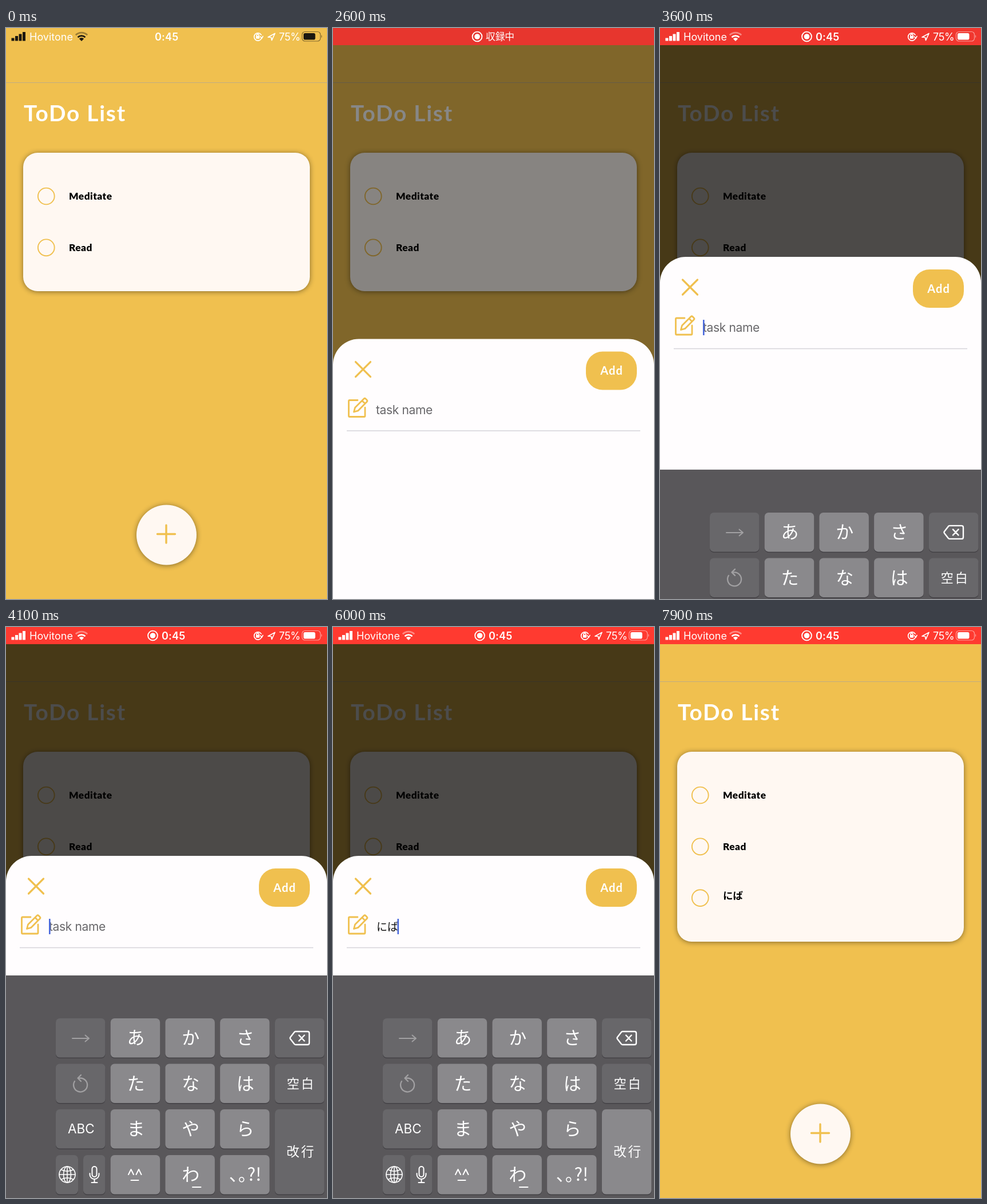
An HTML page for the animation above (8 s loop, 561 by 998 pixels).

```html
<!DOCTYPE html>
<html lang="ja">
<head>
<meta charset="utf-8">
<title>ToDo List</title>
<style>
  html, body { margin: 0; width: 100%; height: 100%; overflow: hidden; background: #f0c04f; }
  svg { display: block; width: 100%; height: 100%; }
  text { white-space: pre; }
  .lato { font-family: Lato, sans-serif; font-weight: 700; }
  .inter { font-family: Inter, sans-serif; }
  .cjk { font-family: "Noto Sans CJK JP", "Noto Sans CJK", sans-serif; }
  .mid { text-anchor: middle; }
  .gold { fill: none; stroke: #f0c04f; stroke-linecap: round; stroke-linejoin: round; }
  .line { fill: none; stroke: #fff; stroke-linecap: round; stroke-linejoin: round; }
  .ink { fill: currentColor; }
  .ink .open { fill: none; stroke: currentColor; }
  .shadow { filter: drop-shadow(0 1px 5px rgba(0, 0, 0, .45)); }
</style>
</head>
<body>
<svg viewBox="0 0 561 998">
  <rect width="561" height="998" fill="#f0c04f"/>
  <path d="M0 95.5H561" stroke="#bfad84"/>
  <text class="lato" x="31" y="163" font-size="38.8" letter-spacing="1.8" fill="#fff">ToDo List</text>

  <rect id="card" class="shadow" x="30" y="218" width="501" height="242" rx="25" fill="#fff8f2"/>
  <g id="rows"></g>

  <circle class="shadow" cx="280.5" cy="886" r="52.5" fill="#fff8f2"/>
  <path class="gold" stroke-width="3.4" d="M264.5 884.5H295.5M280 869V900"/>

  <rect id="dim" width="561" height="998" opacity="0"/>

  <g id="sheet">
    <path d="M0 1000V445A45 45 0 0 1 45 400H516A45 45 0 0 1 561 445V1000Z" fill="#fffdfe"/>
    <path class="gold" stroke-width="3.2" d="M39.5 440L65.5 466M65.5 440L39.5 466"/>
    <rect x="442" y="422" width="89" height="67" rx="29" fill="#f0c04f"/>
    <text class="lato mid" x="487" y="462.5" font-size="20" letter-spacing="1.1" fill="#fff">Add</text>
    <path class="gold" stroke-width="2.8" d="M43 507H29Q27.5 507 27.5 508.5V534.5Q27.5 536 29 536H54.5Q56 536 56 534.5V520M36.5 527.5L38.5 520L54 504.5Q55.5 503 57 504.5L59.2 506.7Q60.7 508.2 59.2 509.7L44 525.3ZM51 508L56 513"/>
    <path d="M24 560.5H537" stroke="#d5d4d9" stroke-width="1.6"/>
    <text id="hint" class="inter" x="75" y="531.3" font-size="21" letter-spacing="-.35" fill="#68676a">task name</text>
    <text id="typed" class="cjk" x="76" y="530.5" font-size="19" fill="#111"></text>
    <rect id="caret" x="75" y="510" width="2.6" height="27" fill="#4a69dc"/>
  </g>

  <g id="board">
    <rect y="609" width="561" height="400" fill="#59575a"/>
    <g id="keys"></g>
    <g class="line" stroke-width="2">
      <path stroke="#a1a0a2" d="M116 719H145M138.5 713.5L145 719L138.5 724.5"/>
      <path stroke="#a1a0a2" stroke-width="2.3" d="M120 794A12 12 0 1 0 130 788.5H126M131 783L125.5 788.5L131 794"/>
      <path stroke-width="2.4" d="M506 707H527Q530 707 530 710V727Q530 730 527 730H506Q505 730 504 729L497 720Q496 718.5 497 717L504 708Q505 707 506 707ZM512 713.5L521.5 723.5M521.5 713.5L512 723.5"/>
      <g stroke-width="1.6">
        <circle cx="107" cy="957" r="14"/>
        <ellipse cx="107" cy="957" rx="6.5" ry="14"/>
        <path d="M93 957H121M107 943V971M96.5 948.5Q107 954 117.5 948.5M96.5 965.5Q107 960 117.5 965.5"/>
      </g>
      <rect x="150.5" y="943" width="8" height="18" rx="4"/>
      <path d="M146.5 955V957A8 8 0 0 0 162.5 957V955M154.5 965V971M149.5 971H159.5"/>
      <path d="M214 957L218.5 948L223 957M227.5 957L232 948L236.5 957M218.5 967H231.5M326 979H340.5"/>
    </g>
  </g>

  <rect id="red" width="561" height="30"/>
  <g id="status" class="inter" font-size="18" fill="#fff">
    <g id="icons" class="ink">
      <path d="M9.5 17.5h5v5h-5zM16 14h5v8.5h-5zM22.5 10.5h5v12h-5zM29 7h5v15.5h-5z"/>
      <path d="M132 23L127.8 18.8A6 6 0 0 1 136.2 18.8Z"/>
      <path class="open" stroke-width="2.7" d="M125.5 16.3A9.3 9.3 0 0 1 138.5 16.3"/>
      <path class="open" stroke-width="2.7" d="M121.8 12.3A14.5 14.5 0 0 1 142.2 12.3" opacity=".4"/>
      <rect class="open" x="517.5" y="6.5" width="32" height="16.5" rx="5" stroke-width="1.2" opacity=".5"/>
      <path d="M551 12Q553.5 14.5 551 17.5Z" opacity=".5"/>
      <rect x="520" y="9" width="20.5" height="11.5" rx="2.8"/>
    </g>
    <text x="41" y="22">Hovitone</text>
    <text id="clock" y="22" font-weight="600" letter-spacing=".2">0:45</text>
    <g class="line" stroke-width="1.7">
      <path d="M446 12A6.7 6.7 0 1 0 446.5 18M444.5 15L447 18L449 14.5"/>
      <path d="M438 14V12.8A2 2 0 0 1 442 12.8V14"/>
      <path d="M458 16L470 9.5L464.5 21.5L463.5 16.5Z"/>
    </g>
    <rect x="436.8" y="13.8" width="6.4" height="5" rx="1"/>
    <text x="477" y="22" letter-spacing="-.3">75%</text>
  </g>
  <text id="label" class="cjk" x="267" y="21" font-size="16.7" fill="#fff">収録中</text>
  <g id="dot">
    <circle r="8.4" class="line" stroke-width="1.9"/>
    <circle r="4.8" fill="#fff"/>
  </g>
</svg>
<script>
const $ = id => document.getElementById(id);
const set = (id, attrs) => { for (const k in attrs) $(id).setAttribute(k, attrs[k]); };
const DARK = '#68676a', LIGHT = '#8a898c', LOOP = 8000;

// Task rows
$('rows').innerHTML = ['Meditate', 'Read', 'にば'].map((name, i) => {
  const y = 294 + 89.8 * i, jp = i === 2;
  const style = jp
    ? `class="cjk" y="${y + 2}" font-size="17.5" font-weight="700"`
    : `class="lato" y="${y + 6.2}" font-size="17.3" style="font-weight: 900" letter-spacing=".5"`;
  return `<g ${jp ? 'id="added"' : ''}>
    <circle class="gold" cx="70.3" cy="${y}" r="14.4" stroke-width="1.9"/>
    <text x="110" ${style}>${name}</text></g>`;
}).join('');

// Keyboard
const colX = [87, 182.7, 278.4, 374.1, 470], rowY = [684, 763.5, 843, 923];
function key(x, y, label = '', size = 31, fill = LIGHT, w = 86.5, h = 68.5, id = '') {
  const cls = label === 'ABC' ? 'inter' : 'cjk';
  const gap = fill === DARK && cls === 'cjk' ? 3 : 0;
  return `<rect x="${x}" y="${y + 1.5}" width="${w}" height="${h}" rx="7" fill="#434145"/>
    <rect id="${id}" x="${x}" y="${y}" width="${w}" height="${h}" rx="7" fill="${fill}"/>
    <text class="${cls} mid" x="${x + w / 2 + 1 + gap / 2}" y="${y + h / 2 + size * .36}"
      font-size="${size}" letter-spacing="${gap}" fill="#fff">${label}</text>`;
}
const kana = ['あかさ', 'たなは', 'まやら', [' ', 'わ', '､｡?!']];
const keys = kana.flatMap((row, r) => [...row].map((c, i) => key(colX[i + 1], rowY[r], c)));
keys.push(
  key(colX[0], rowY[0], '', 0, DARK), key(colX[0], rowY[1], '', 0, DARK),
  key(colX[0], rowY[2], 'ABC', 22.5, DARK),
  key(colX[0], rowY[3], '', 0, DARK, 39), key(135, rowY[3], '', 0, DARK, 38.5),
  key(colX[4], rowY[0], '', 0, DARK), key(colX[4], rowY[1], '空白', 22, DARK),
  key(colX[4], rowY[2], '改行', 22.5, DARK, 86.5, 148.5, 'enter'));
$('keys').innerHTML = keys.join('');

const ramp = (t, start, length) => Math.min(1, Math.max(0, (t - start) / length));
const easeOut = x => 1 - (1 - x) ** 3;
const easeBoth = x => x * x * (3 - 2 * x);
const show = (id, on) => set(id, { visibility: on ? 'visible' : 'hidden' });

function draw(t) {
  // Recording bar with a slow pulse
  const recording = t >= 500, announcing = recording && t < 3500;
  const pulse = (1 + Math.cos((t - 2050) / 1950 * 2 * Math.PI)) / 2;
  const mix = (a, b) => Math.round(a + (b - a) * pulse);
  set('red', { fill: `rgb(${mix(215, 255)},${mix(51, 58)},${mix(44, 48)})`, opacity: ramp(t, 400, 250) });
  show('status', !announcing);
  show('label', announcing);
  show('dot', recording);
  set('dot', { transform: `translate(${announcing ? 252 : 256.5} 15)` });
  set('clock', { x: recording ? 272 : 260 });
  set('icons', { color: recording ? '#fff' : '#1c1810' });

  // Sheet and backdrop
  const rise = easeOut(ramp(t, 2400, 530)) - easeBoth(ramp(t, 7250, 350));
  set('sheet', { transform: `translate(0 ${600 * (1 - rise)})` });
  set('dim', { opacity: .7 * (ramp(t, 2400, 300) - ramp(t, 7250, 350)) });

  // Keyboard and typing
  const up = easeOut(ramp(t, 3500, 400)) - easeBoth(ramp(t, 6150, 300));
  set('board', { transform: `translate(0 ${390 * (1 - up)})` });
  set('enter', { fill: t >= 5900 && t < 6150 ? LIGHT : DARK });
  const text = t < 4700 ? '' : t < 5200 ? 'に' : t < 5600 ? 'には' : 'にば';
  $('typed').textContent = text;
  show('hint', !text);
  show('caret', t >= 3500 && t < 6150);
  set('caret', { x: text ? 74.5 + 19 * text.length : 75 });

  // List grows by one row
  const done = t >= 7250;
  set('card', { height: done ? 332 : 242 });
  show('added', done);
}

function tick() {
  draw(performance.now() % LOOP);
  requestAnimationFrame(tick);
}
tick();
</script>
</body>
</html>
```
